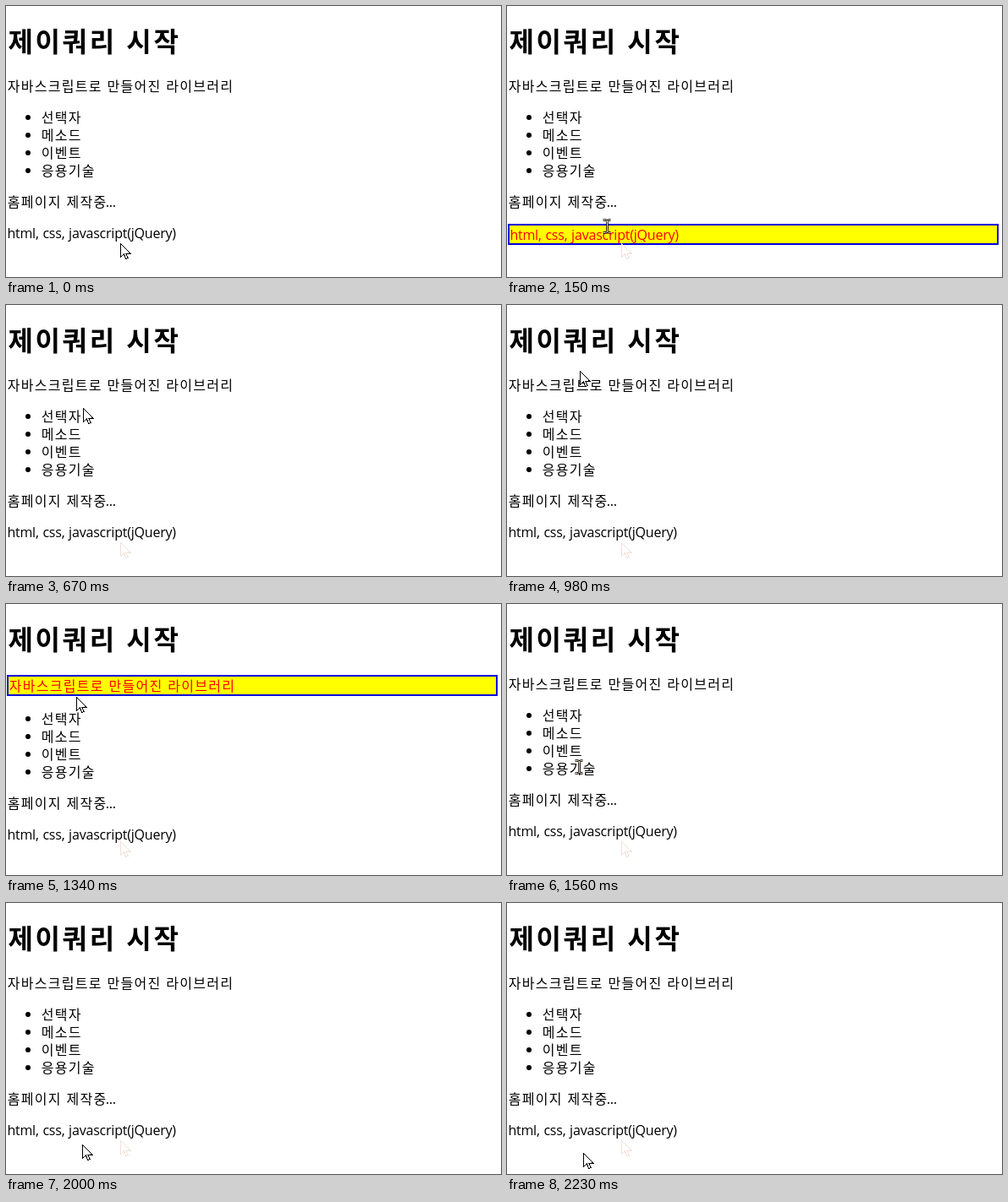
Write an HTML page that moves like this. It is 585 px wide and 321 px high and loops after 2300 ms.

```html
<!DOCTYPE html>
<html lang="ko">
<head>
<meta charset="utf-8">
<title>제이쿼리 시작</title>
<style>
html, body { margin: 0; width: 100%; height: 100%; overflow: hidden; background: #fff; }
svg { display: block; }
text { font: 350 16px "Noto Sans CJK KR", "Noto Sans CJK JP", "Noto Sans CJK", sans-serif; letter-spacing: 1.28px; white-space: pre; }
.title { font-size: 32px; font-weight: bold; letter-spacing: 2.64px; }
.latin { font-family: "Open Sans", "Noto Sans", sans-serif; font-weight: 400; letter-spacing: -.21px; word-spacing: .8px; }
.box { fill: #ff0; stroke: #0000dc; stroke-width: 2; visibility: hidden; }
.hot .box { visibility: visible; }
.hot text { fill: #f00; transform: translate(2px, 2px); }
#arrow { shape-rendering: crispEdges; }
</style>
</head>
<body>
<svg width="585" height="321" viewBox="0 0 585 321">
  <defs>
    <path id="arrow" d="M.5 .5V16.5L4.2 12.8L6.7 18.4L9 17.4L6.5 12H11.7Z"/>
    <path id="beam" d="M-4.5 -7.5H-1.5L.5 -6.5L2.5 -7.5H4.5M.5 -6.5V6.5M-4.5 7.5H-1.5L.5 6.5L2.5 7.5H4.5"/>
  </defs>
  <text class="title" x="2.4" y="53.6">제이쿼리 시작</text>
  <g class="row">
    <rect class="box" x="2" y="85" width="578" height="23"/>
    <text x="1.7" y="101">자바스크립트로 만들어진 라이브러리</text>
  </g>
  <g class="row">
    <circle cx="26" cy="132" r="3"/><text x="41.8" y="138">선택자</text>
    <circle cx="26" cy="153" r="3"/><text x="41.8" y="159">메소드</text>
    <circle cx="26" cy="174" r="3"/><text x="41.8" y="180">이벤트</text>
    <circle cx="26" cy="195" r="3"/><text x="41.8" y="201">응용기술</text>
  </g>
  <g class="row">
    <rect class="box" x="2" y="222" width="578" height="23"/>
    <text x="1.7" y="238">홈페이지 제작중<tspan class="latin" dx="-1.7">...</tspan></text>
  </g>
  <g class="row">
    <rect class="box" x="2" y="259" width="578" height="23"/>
    <text class="latin" x="1.4" y="275">html, css, javascript(jQuery)</text>
  </g>
  <use id="trail" href="#arrow" x="135" y="281" fill="#fff" stroke="#f1e0d6"/>
  <g id="pointer">
    <use id="arrowCursor" href="#arrow" fill="#fff" stroke="#000"/>
    <g id="beamCursor" fill="none">
      <use href="#beam" stroke="#000" stroke-width="2.6"/>
      <use href="#beam" stroke="#ffe9c8" stroke-width=".9"/>
    </g>
  </g>
</svg>
<script>
const LOOP = 2300, NONE = 9;
const A = false, I = true;
// time, x, y, text cursor, highlighted row
const steps = [
  [0, 135, 281, A, NONE],
  [70, 130, 272, I, 3],
  [150, 118, 261, I, 3],
  [220, 106, 249, A, NONE],
  [290, 98, 239, I, 2],
  [370, 96, 234, I, 2],
  [440, 94, 218, A, NONE],
  [520, 93, 190, I, NONE],
  [590, 91, 145, A, NONE],
  [670, 91, 122, A, NONE],
  [740, 89, 103, I, 0],
  [820, 87, 97, I, 0],
  [980, 86, 78, A, NONE],
  [1050, 85, 53, I, NONE],
  [1200, 84, 68, A, NONE],
  [1270, 83, 95, I, 0],
  [1340, 83, 110, A, 0],
  [1420, 83, 130, I, NONE],
  [1490, 84, 158, I, NONE],
  [1560, 85, 193, I, NONE],
  [1640, 87, 232, I, 2],
  [1710, 88, 261, I, 3],
  [1780, 88, 265, I, 3],
  [1930, 88, 271, I, 3],
  [2000, 90, 286, A, NONE],
  [2080, 91, 296, A, NONE],
  [2230, 90, 296, A, NONE]
];
const byId = id => document.getElementById(id);
const rows = document.querySelectorAll('.row');
const show = (id, on) => byId(id).setAttribute('visibility', on ? 'visible' : 'hidden');
const start = performance.now();

function draw(now) {
  const t = Math.max(0, now - start) % LOOP;
  const [time, x, y, beam, hot] = steps.findLast(s => s[0] <= t);
  rows.forEach((row, i) => {
    row.classList.toggle('hot', i === hot);
    row.setAttribute('transform', `translate(0 ${i > hot ? 4 : 0})`);
  });
  byId('pointer').setAttribute('transform', `translate(${x} ${y})`);
  show('arrowCursor', !beam);
  show('beamCursor', beam);
  show('trail', time > 0);
  requestAnimationFrame(draw);
}
draw(start);
</script>
</body>
</html>
```
